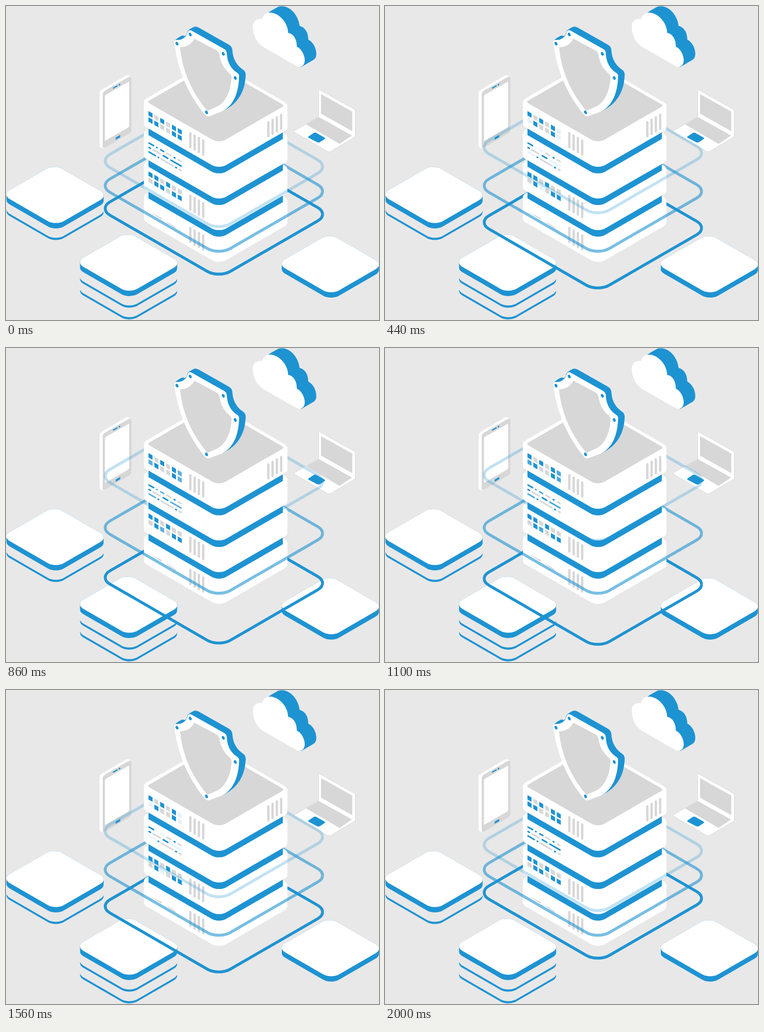
These frames come from a looping animation (733x617 px, 2.02 s). An HTML page:

```html
<!DOCTYPE html>
<html lang="en">
<head>
<meta charset="utf-8">
<title>Secure server</title>
<style>
html, body { margin: 0; width: 100%; height: 100%; overflow: hidden; background: #e8e8e8; }
svg { display: block; width: 100%; height: 100%; }
</style>
</head>
<body>
<svg id="stage" viewBox="0 0 733 617"></svg>
<script>
const BLUE = '#1e93d2', GRAY = '#d7d7d7', WHITE = '#fff', BACK = '#e8e8e8';
const K = 1 / Math.sqrt(3), S = Math.SQRT1_2, E = Math.SQRT2 - 1;
const LOOP = 2020, STEP = 20, HALF = 1000, TRAVEL = 61.5;
const stage = document.getElementById('stage');

function add(tag, attrs, parent = stage) {
  const node = document.createElementNS('http://www.w3.org/2000/svg', tag);
  for (const name in attrs) node.setAttribute(name, attrs[name]);
  return parent.appendChild(node);
}
const fill = (d, color, parent) => add('path', { d, fill: color }, parent);
const line = (d, color, width, cap = 'round', parent) => add('path', {
  d, fill: 'none', stroke: color, 'stroke-width': width, 'stroke-linecap': cap
}, parent);

// Isometric rounded slab: (x, y) is the sharp left corner, p and q the
// horizontal reach of the front edges, a the corner radius, h the height,
// c the radius of the bottom corner.
function slab(x, y, p, q, a, h = 0, c = a) {
  const arc = (r, ex, ey) => `A${r} ${r * K} 0 0 0 ${ex} ${ey}`;
  const s = a * S, t = s * K, e = a * E;
  const bx = x + p, by = y + p * K + h - c * S * K;
  const rx = bx + q, ry = y + (p - q) * K;
  const tx = x + q, ty = y - q * K + t;
  const front = `M${x + e} ${y + h}${arc(a, x + s, y + h + t)}L${bx - c * S} ${by}` +
    `${arc(c, bx + c * S, by)}L${rx - s} ${ry + h + t}${arc(a, rx - e, ry + h)}`;
  const rear = `${arc(a, rx - s, ry - t)}L${tx + s} ${ty}${arc(a, tx - s, ty)}` +
    `L${x + s} ${y - t}${arc(a, x + e, y)}`;
  return { front, back: `M${rx - e} ${ry}${rear}`, whole: `${front}V${ry}${rear}Z` };
}

function platform(dx, dy, lines) {
  const top = (y, h) => slab(dx - 8.1, dy + 370.5 + y, 106, 103, 22, h).whole;
  for (let i = lines; i > 0; i--) {
    const drop = 10.3 + 23 * i;
    fill(top(drop), BLUE);
    fill(top(drop - 4.3), BACK);
  }
  fill(top(0, 10.5), BLUE);
  fill(top(0), WHITE);
}

function phone() {
  fill('M184 172Q184 167 189 164L236 136.5Q240 134.5 246 139L200 270L192 280Q184 279 184 274Z', WHITE);
  fill('M190 174Q190 169 195 166L241 139.5Q246.5 137 246.5 142V243Q246.5 248 242 250.5L195 278Q190 281 190 276Z', GRAY);
  fill('M194.5 178Q194.5 175.5 197 174L240 149.5Q242 148.5 242 150V235Q242 237.5 240 239L194.5 265Z', WHITE);
  line('M211 161.3L218.5 157', BLUE, 2.2);
  line('M222.8 154.6L223.2 154.4', BLUE, 3);
  fill('M215.5 258.5L224.5 253.3V257.7L215.5 263Z', BLUE);
}

function laptop() {
  add('path', {
    d: 'M614.5 167Q614.5 163.5 617 165L684 202.5Q686.5 204 686.5 207V257L638 286Q635 287.5 632 286L567 248Q565 246 568 244.5L614.5 217Z',
    fill: WHITE, stroke: GRAY, 'stroke-width': 1
  });
  fill('M619 173L680.5 207.5V246L619 211.5Z', GRAY);
  fill('M589.5 232.5L614.5 218L680 254.5L655.5 271Z', GRAY);
  fill('M595 256L604 250Q607 248 610 249.5L626 258.5Q628 260 626 261.5L617 267.5Q614 269 611 267.5L595 259Q592.5 257.5 595 256Z', BLUE);
}

function cloud() {
  fill('M506 20Q520 9 535 1.5C556-5 575 18 577 39C588 42 594 52 594 66C606 72 611 88 609.5 97Q609 103 604 106L580 120Z', BLUE);
  fill('M485 43C484 30 493 24 503 26C506 12 521 9 536 19C548 28 554 40 554.5 53C565 54 572 66 571.5 80C582 84 588 100 587 108C586 119 578 122 569 117L508 82C494 74 486 60 485 43Z', WHITE);
}

function shield() {
  fill('M331 69Q333 65 345 58.5Q349 58 352 59Q356 56 357 49Q362 44 371 40.5Q374 40 378 42L438 76Q445 80 445 88C446 106 455 118 467 126Q471 129 471 136C470 165 458 192 425 207L400 200L340 80Z', BLUE);
  fill('M331 74Q329 68 334 66.5C343 68 353 64 357 52Q358 46 364 48L428 84Q434 87 434 94C435 112 443 124 454 131Q459 134 458 140C457 170 447 196 425 207L400 216.5Q395 218 391 214C360 176 338 130 331 74Z', WHITE);
  fill('M342 81C355 81 365 75 370 64L413 87Q419 90 420 98C422 113 430 125 441 134Q444 137 443 144C441 170 430 190 416 197L396 206C370 176 347 134 342 81Z', GRAY);
  for (const [x, y] of [[336, 74], [362, 56], [427, 94], [450.5, 141.5], [394, 209]])
    add('ellipse', { rx: 2.6, ry: 3.8, fill: BLUE, transform: `translate(${x} ${y}) rotate(-28)` });
}

const blinkers = [];
// b: steady blue, g: gray, x: blinking blue
function light(kind, draw) {
  const node = draw(kind === 'g' ? GRAY : BLUE);
  if (kind === 'x') blinkers.push(node);
}

function leds(dy, rows) {
  rows.forEach((row, r) => [...row].forEach((kind, i) => {
    const x = 280 + 11.5 * i, y = 206.4 + dy + 6.65 * i + 12 * r;
    light(kind, color => fill(`M${x} ${y}l8 4.6v8.8l-8-4.6Z`, color));
  }));
}

function vents(x, y, slope) {
  for (let i = 0; i < 4; i++)
    line(`M${x + 8.4 * i} ${y + slope * i}v27.5`, GRAY, 4.6);
}

function dashes(rows) {
  rows.forEach((row, r) => row.forEach(([kind, from, to]) => {
    const y = x => 269.2 + (x - 281) * K + 8.8 * r;
    light(kind, color => line(`M${from} ${y(from)}L${to} ${y(to)}`, color, 3));
  }));
}

function band(dy) {
  const x = 418.5, y = 333.6 + dy, c = 20 * S, t = c * K;
  const left = 280, right = 544;
  fill(`M${left} ${y - 100}V${y - (x - left) * K}L${x - c} ${y - t}` +
    `A20 ${20 * K} 0 0 0 ${x + c} ${y - t}L${right} ${y - (right - x) * K}V${y - 100}Z`, BLUE);
}

function server() {
  for (let i = 3; i >= 0; i--) {
    const dy = 62.2 * i;
    if (i < 3) band(dy);
    fill(slab(262.7, 189.3 + dy, 155.8, 142.8, 20, 41.5).whole, WHITE);
  }
  fill(slab(277, 188.5, 141.5, 129, 6, 0, 18).whole, GRAY);

  leds(0, ['bgbgbx', 'xbggbx']);
  leds(118.5, ['bbgbgg', 'gbxgbb']);
  dashes([
    [['b', 281, 290], ['x', 296, 297], ['x', 304, 310], ['g', 316, 324], ['b', 330.5, 332], ['g', 338.5, 344]],
    [['b', 281, 284], ['g', 289, 303], ['b', 309, 318], ['x', 324, 344]],
    [['x', 281, 293.5], ['b', 299, 300], ['g', 305, 328], ['b', 333.5, 335], ['g', 340.5, 344]]
  ]);
  fill('M283 405.5L306 416.5V420Z M313 423L322 427L334 435.5L333 437Z', GRAY);
  for (const dy of [0, 123, 186.5]) vents(362.3, 249.8 + dy, 4.85);
  vents(515.5, 228.5, -4.85);
}

const rings = [
  { y: 304.5, opacity: 0.27, dir: -1 },
  { y: 353, opacity: 0.6, dir: 0 },
  { y: 398, opacity: 1, dir: 1 }
];
function drawRings(side) {
  for (const ring of rings) {
    ring[side] = add('g', { opacity: ring.opacity });
    line(slab(181.7, ring.y, 236.5, 217.1, 32)[side], BLUE, 5.6, 'butt', ring[side]);
  }
}

platform(0, 0, 1);
platform(144.5, 133, 2);
platform(541, 136, 0);
phone();
laptop();
cloud();
drawRings('back');
server();
drawRings('front');
shield();

function render(time) {
  const t = Math.floor((time % LOOP) / STEP) * STEP;
  const p = Math.max(0, 1 - Math.abs(t / HALF - 1));
  for (const { back, front, dir } of rings) {
    const move = `translate(0 ${dir * TRAVEL * p})`;
    back.setAttribute('transform', move);
    front.setAttribute('transform', move);
  }
  const glow = Math.abs(1 - 2 * p);
  for (const node of blinkers) node.setAttribute('opacity', glow);
}

const start = performance.now();
function tick() {
  render(performance.now() - start);
  requestAnimationFrame(tick);
}
tick();
</script>
</body>
</html>
```
